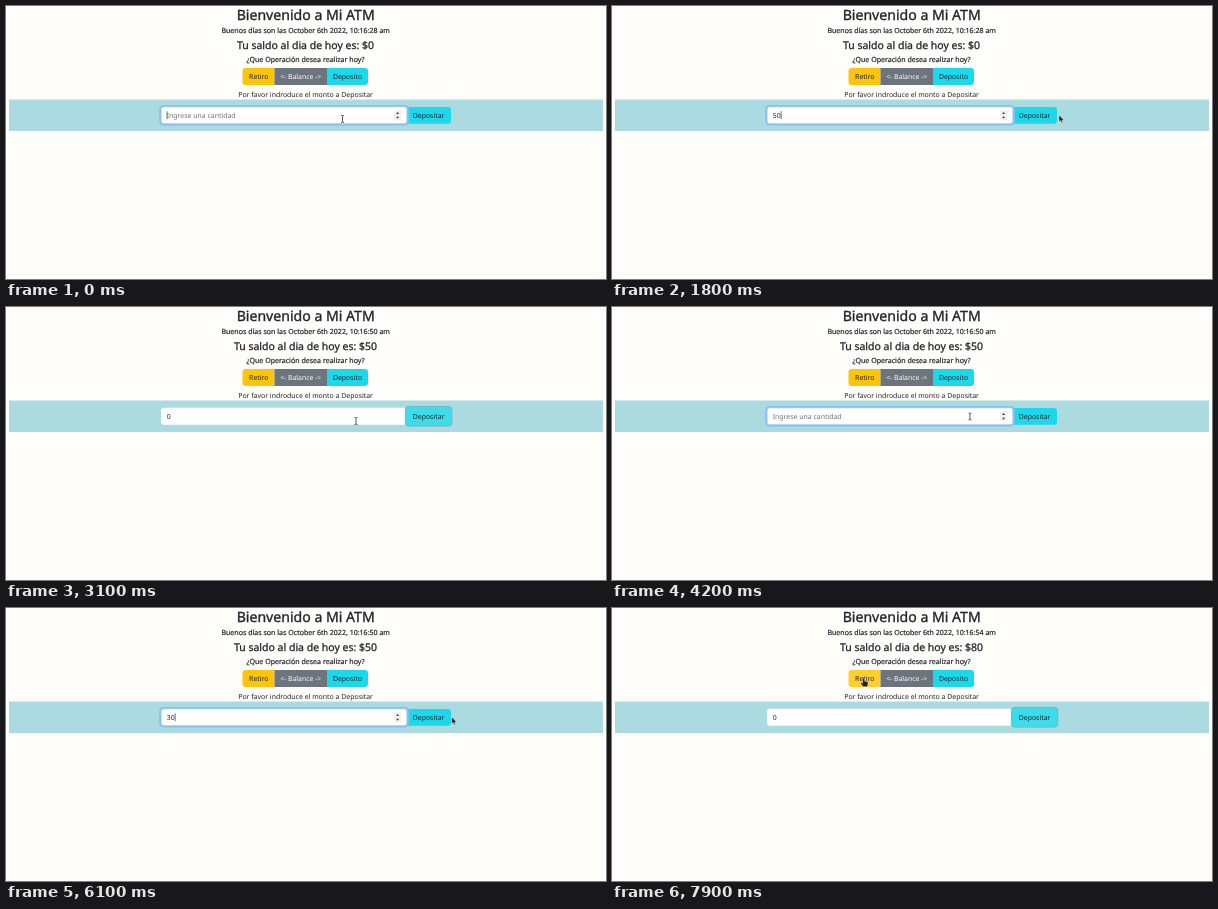
Write an HTML page that moves like this. It is 600 px wide and 273 px high and loops after 8 s.

```html
<!DOCTYPE html>
<html lang="es">
<head>
<meta charset="utf-8">
<title>Mi ATM</title>
<style>
  html, body { margin: 0; height: 100%; overflow: hidden; background: #fffdfa; }
  svg { display: block; width: 100vw; height: 100vh; }
  text { font: 6.93px "Noto Sans", "Open Sans", sans-serif; fill: #212529; text-rendering: geometricPrecision; white-space: pre; }
  .mid { text-anchor: middle; }
  .bold { stroke: #212529; stroke-width: .2px; }
</style>
</head>
<body>
<svg viewBox="0 0 600 273">
  <g class="mid">
    <text class="bold" x="299.7" y="14" style="font-size:14.1px;stroke-width:.35px">Bienvenido a Mi ATM</text>
    <text class="bold" id="clock" x="299.7" y="27.3" style="font-size:7.05px"></text>
    <text class="bold" id="balance" x="299.5" y="43.2" style="font-size:10.5px;stroke-width:.28px"></text>
    <text class="bold" x="299.5" y="56.2" style="font-size:7.07px">¿Que Operación desea realizar hoy?</text>
    <path id="retiro" d="M268.5 62H239.5a3 3 0 0 0-3 3V76a3 3 0 0 0 3 3H268.5Z"/>
    <path id="middle" d="M268.5 62H321V79H268.5Z"/>
    <path id="deposito" d="M321 62H359a3 3 0 0 1 3 3V76a3 3 0 0 1-3 3H321Z"/>
    <text x="252.8" y="73">Retiro</text>
    <text x="294.7" y="73" style="fill:#fff;font-size:6.85px">&lt;- Balance -&gt;</text>
    <text x="341.5" y="73">Deposito</text>
    <text x="299.6" y="90.5">Por favor indroduce el monto a Depositar</text>
  </g>
  <path d="M3 93.5H597V125H3Z" fill="#abdbe0"/>
  <path id="submit" d="M400 101H442a3 3 0 0 1 3 3V114.7a3 3 0 0 1-3 3H400Z"/>
  <rect id="ring" x="153.2" y="98.9" width="249.6" height="20.7" rx="4.2" fill="#8fc0ec"/>
  <rect x="155.1" y="100.8" width="245.8" height="16.9" rx="2.6" fill="#fff"/>
  <rect id="edge" x="155.1" y="100.8" width="245.8" height="16.9" rx="2.6" fill="none" stroke="#86b7fe" stroke-width=".6"/>
  <g id="spin">
    <path d="M388 104.3H395.3V114.3H388Z" fill="#f1f1f1"/>
    <path d="M390 108L391.6 106L393.2 108ZM390 110.8L391.6 112.8L393.2 110.8Z" fill="#444"/>
  </g>
  <rect id="glow" x="399.4" y="99.5" width="46.4" height="19.6" rx="3.2" fill="#3ddcea" stroke="#72b7c1"/>
  <text class="mid" x="422.6" y="111.8">Depositar</text>
  <text id="value" x="160.7" y="111.8"></text>
  <path id="caret" d="M0 105.2V113.3" stroke="#222" stroke-width=".6"/>
  <g id="cursor">
    <path id="beam" d="M-1.5 -3.5Q0 -3.5 0 -2.8Q0 -3.5 1.5 -3.5M0 -2.8V2.8M-1.5 3.5Q0 3.5 0 2.8Q0 3.5 1.5 3.5" fill="none" stroke="#333" stroke-width=".8"/>
    <path id="hand" d="M-.9 .6Q0 -.6 .9 .6V3L3.9 3.8Q4.8 4.2 4.5 6L3.9 8.8H-.3L-3 5.2Q-2.5 3.9 -.9 5.2Z" fill="#222" stroke="#fff" stroke-width=".4"/>
    <path id="arrow" d="M0 0V7L1.6 5.6L2.7 8L3.8 7.5L2.8 5.2H5Z" fill="#222" stroke="#fff" stroke-width=".4"/>
  </g>
</svg>
<script>
const $ = id => document.getElementById(id);
const LOOP = 8000, STEP = 100;

// Cursor hot spot: time, x, y
const path = [
  [0, 336.5, 113], [1300, 336.5, 113], [1600, 425, 111], [1700, 444, 110], [1800, 447, 109],
  [2000, 432, 109], [2200, 418, 109], [2400, 396.5, 108], [2700, 372, 115], [3100, 350, 114],
  [3400, 358, 109.5], [5300, 358, 109.5], [5400, 414, 101.5], [5700, 455, 107], [5900, 469, 109],
  [6200, 434, 109], [6600, 430.5, 109], [6800, 424, 107], [7000, 388, 93], [7100, 365, 80],
  [7400, 322, 73], [7700, 268, 71], [7900, 251.5, 70], [8000, 251.5, 70]
];
// Field content and caret: time, value, caret visible
const typing = [
  [0, "", 1], [200, "5", 1], [400, "50", 1], [900, "50", 0], [1400, "50", 1], [1900, "50", 0],
  [2300, "0", 0], [3600, "0", 1], [4200, "", 0], [4800, "3", 1], [5000, "30", 1],
  [5500, "30", 0], [6000, "30", 1], [6300, "30", 0], [6400, "0", 0]
];
// Account: time, balance, seconds on the clock
const account = [[0, 0, 28], [2300, 50, 50], [6400, 80, 54]];

const at = (list, t) => list.findLast(k => k[0] <= t);
const show = (id, o) => $(id).setAttribute("opacity", +o);
const paint = (id, hover, base, lit) => $(id).setAttribute("fill", hover ? lit : base);
const ramp = (t, start) => Math.min(1, Math.max(0, (t - start + STEP) / 200));

function pointer(t) {
  const i = path.findIndex(k => k[0] > t);
  const [t0, x0, y0] = path[i - 1], [t1, x1, y1] = path[i];
  const p = (t - t0) / (t1 - t0);
  return [x0 + (x1 - x0) * p, y0 + (y1 - y0) * p];
}

function draw(t) {
  const [, sum, sec] = at(account, t);
  $("clock").textContent = `Buenos días son las October 6th 2022, 10:16:${sec} am`;
  $("balance").textContent = `Tu saldo al dia de hoy es: $${sum}`;

  const focus = 1 - ramp(t, 2200) + ramp(t, 3600) - ramp(t, 6300);
  show("ring", focus);
  show("edge", focus);
  show("spin", focus > .5);
  show("glow", 1 - focus);

  const [, value, caret] = at(typing, t);
  $("value").textContent = value || "Ingrese una cantidad";
  $("value").style.fill = value ? "#212529" : "#6c757d";
  show("caret", caret);
  $("caret").setAttribute("transform", `translate(${161 + value.length * 4.1})`);

  const [x, y] = pointer(t);
  const over = (l, top, r, b) => x >= l && x < r && y >= top && y < b;
  const onRetiro = over(236, 62, 268.5, 79), onMiddle = over(268.5, 62, 321, 79);
  const onDeposito = over(321, 62, 362, 79), onSubmit = over(395, 100, 445, 118);
  paint("retiro", onRetiro, "#fcc50c", "#ffcd30");
  paint("middle", onMiddle, "#6c757d", "#5c636a");
  paint("deposito", onDeposito, "#1cd8ea", "#3ddcea");
  paint("submit", onSubmit, "#1cd8ea", "#30dcec");

  const hand = onRetiro || onMiddle || onDeposito || onSubmit;
  const beam = over(155, 101, 395, 118);
  show("hand", hand);
  show("beam", beam);
  show("arrow", !hand && !beam);
  $("cursor").setAttribute("transform", `translate(${x} ${y})`);
}

function tick() {
  draw(Math.floor(performance.now() % LOOP / STEP) * STEP);
  requestAnimationFrame(tick);
}
tick();
</script>
</body>
</html>
```
